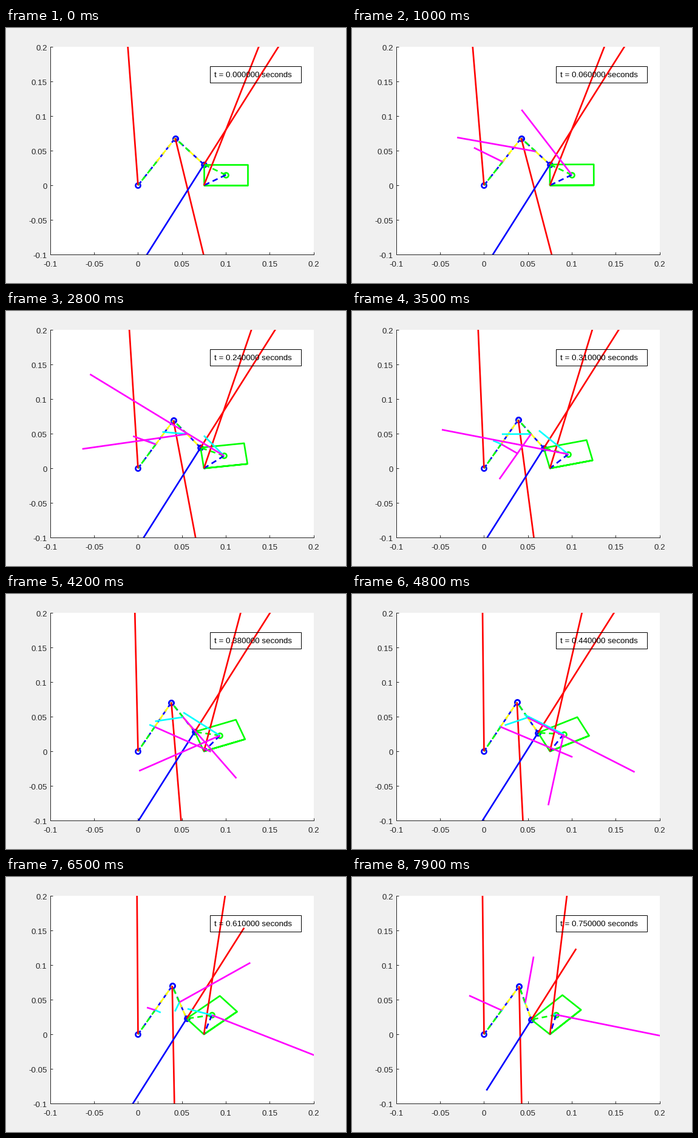
Animation, 560 px wide and 420 px high, one loop 8000 ms. Source, as a matplotlib script:

```python
import numpy as np
import matplotlib.pyplot as plt
from matplotlib.animation import FuncAnimation
from matplotlib.patches import Rectangle

W, H, DPI = 560, 420, 100
PX = 72 / DPI                          # points per pixel
L, R, T, B = 72.8, 506.8, 30.6, 373.4  # axes edges in pixels

# Mechanism: two links driving a hinged box
L1, L2, BW, BH = 0.08, 0.05, 0.05, 0.03
M1, M2, M3, G = 0.5, 0.3, 0.05, 9.81
TEND, STEP = 0.8, 0.01
ORIGIN = np.zeros(2)
HINGE = np.array([0.075, 0.0])
DOWN = np.array([0.0, -G])
PUSH = np.array([-1.0, -2.0])          # direction of the push on the box
INERTIA = M3 * ((BW**2 + BH**2) / 4 + (BW**2 + BH**2) / 12)


def cross(a, b):
    return a[0] * b[1] - a[1] * b[0]


def perp(v):
    return np.array([-v[1], v[0]])


def unit(a):
    return np.array([np.cos(a), np.sin(a)])


def angles(t):
    """Box, first link and second link angles at time t."""
    u = np.clip(t / TEND, 0, 1)
    phi = np.pi / 4 * (10 * u**3 - 15 * u**4 + 6 * u**5)
    tip = HINGE + BH * perp(unit(phi))
    d = np.hypot(*tip)
    a = (d**2 + L1**2 - L2**2) / (2 * d)
    elbow = (a * tip + np.sqrt(L1**2 - a**2) * perp(tip)) / d
    rest = tip - elbow
    return np.array([phi, np.arctan2(elbow[1], elbow[0]),
                     np.arctan2(rest[1], rest[0])])


def state(k):
    t = k * STEP
    now, prev, old = (angles(t - j * STEP) for j in range(3))
    w = (now - prev) / STEP
    al = (now - 2 * prev + old) / STEP**2

    ex = unit(now[0])
    ey = perp(ex)
    r3 = BW / 2 * ex + BH / 2 * ey
    r1, r2 = L1 / 2 * unit(now[1]), L2 / 2 * unit(now[2])
    elbow = 2 * r1
    tip = elbow + 2 * r2
    corners = [HINGE + p for p in (0 * ex, BW * ex, BW * ex + BH * ey, BH * ey)]
    mids = [r1, elbow + r2, HINGE + r3]

    def vel(i, r):
        return w[i] * perp(r)

    def acc(i, r):
        return al[i] * perp(r) - w[i]**2 * r

    vels = [vel(1, r1), 2 * vel(1, r1) + vel(2, r2), vel(0, r3)]
    accs = [acc(1, r1), 2 * acc(1, r1) + acc(2, r2), acc(0, r3)]

    need = INERTIA * al[0] - cross(r3, M3 * DOWN)
    push = PUSH * need / cross(BH * ey, PUSH)
    hinge = M3 * (accs[2] - DOWN) - push
    at_elbow = M2 * (accs[1] - DOWN) + push
    base = M1 * (accs[0] - DOWN) + at_elbow
    forces = [(ORIGIN, base), (elbow, -at_elbow), (tip, -push), (HINGE, hinge)]
    return elbow, tip, corners, mids, vels, accs, forces, push


fig = plt.figure(figsize=(W / DPI, H / DPI), dpi=DPI, facecolor="#f0f0f0")
plt.rcParams["font.family"] = "Liberation Sans"
ax = fig.add_axes([L / W, 1 - B / H, (R - L) / W, (B - T) / H])
ax.set(xlim=(-0.1, 0.2), ylim=(-0.1, 0.2))
INK = "#262626"
ticks = np.arange(-2, 5) * 0.05
ax.set_xticks(ticks, [""] * 7)
ax.set_yticks(ticks, [""] * 7)
ax.tick_params(direction="in", length=4.3 * PX, width=PX, color=INK)
for side in ("left", "bottom"):
    ax.spines[side].set(color=INK, linewidth=PX)
for side in ("right", "top"):
    ax.spines[side].set_visible(False)


def put(x, y, s, ha="left", color=INK):
    return fig.text(x / W, 1 - y / H, s, ha=ha, va="baseline",
                    color=color, fontsize=13.33 * PX)


for i, v in enumerate(ticks):
    name = f"{round(v, 2) + 0:g}"
    put(L + (R - L) * i / 6, 393, name, "center")
    put(67.5, B - (B - T) * i / 6 + 6, name, "right")

fig.add_artist(Rectangle((336 / W, 1 - 90 / H), 150 / W, 27 / H,
                         transform=fig.transFigure, fill=False,
                         edgecolor="black", linewidth=PX))
clock = put(343, 81, "", color="black")


def line(color, dashed=False, **kw):
    style = (0, (3.4, 2.25)) if dashed else "-"
    return ax.plot([], [], color=color, ls=style, lw=2.67 * PX,
                   solid_capstyle="butt", dash_capstyle="butt",
                   markersize=8 * PX, markeredgewidth=2.67 * PX,
                   markerfacecolor="none", **kw)[0]


LIME, BLUE, YELLOW = "#00ff00", "#0000ff", "#ffff00"
links = [line(BLUE, True, marker="o") for _ in range(2)]
halves = [line(c, True) for c in (LIME, YELLOW, LIME, YELLOW)]
box = line(LIME)
center = line(LIME, marker="o")
arms = [line(LIME, True), line(BLUE, True)]
reds = [line("#ff0000") for _ in range(4)]
back = line(BLUE)
cyans = [line("#00ffff") for _ in range(3)]
pinks = [line("#ff00ff") for _ in range(3)]


def path(ln, *pts):
    ln.set_data(*np.array(pts).T)


def draw(i):
    k = max(0, i - 4)
    elbow, tip, corners, mids, vels, accs, forces, push = state(k)
    path(links[0], elbow, ORIGIN)
    path(links[1], tip, elbow)
    ends = [(mids[0], ORIGIN), (mids[0], elbow), (mids[1], elbow), (mids[1], tip)]
    for ln, seg in zip(halves, ends):
        path(ln, *seg)
    path(box, *corners, corners[0], corners[1])
    path(center, mids[2])
    path(arms[0], mids[2], tip)
    path(arms[1], mids[2], HINGE)
    for ln, (p, f) in zip(reds, forces):
        path(ln, p, p + f)
    path(back, tip, tip + push)
    for c, m, p, v, a in zip(cyans, pinks, mids, vels, accs):
        path(c, p, p + v)
        path(m, p, p + a)
    clock.set_text(f"t = {k * STEP:.6f} seconds")
    return []


anim = FuncAnimation(fig, draw, frames=80, interval=100, repeat=True,
                     repeat_delay=0, init_func=lambda: draw(0))
plt.show()
```
